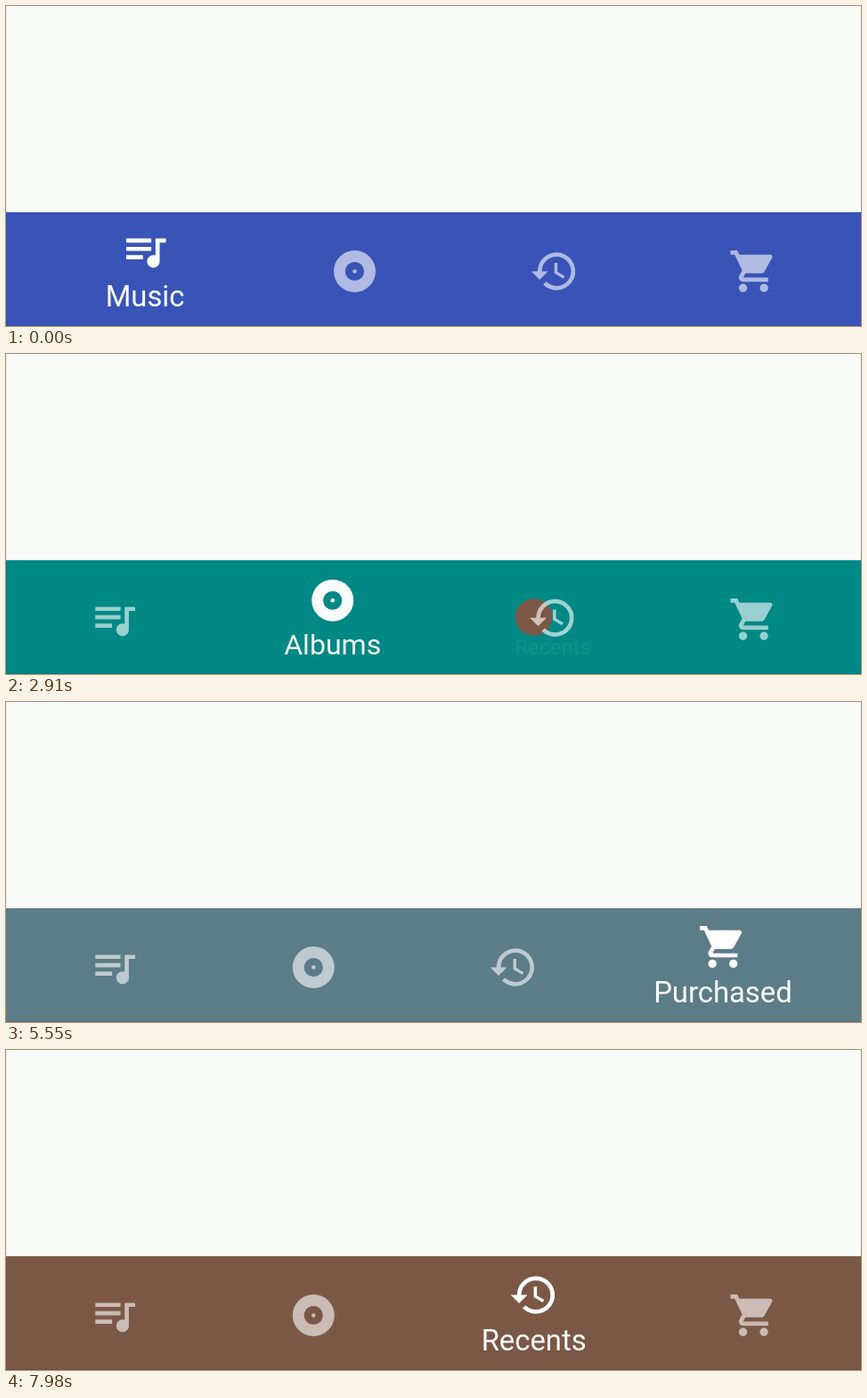
An HTML page with a canvas that plays this animation: 960x360 px, repeating every 8 s.

```html
<!DOCTYPE html>
<html lang="en">
<head>
<meta charset="utf-8">
<title>Shifting bottom navigation</title>
<style>
  html, body { margin: 0; width: 100%; height: 100%; overflow: hidden; background: #f9fbf8; }
  canvas { display: block; }
</style>
</head>
<body>
<canvas id="stage" width="960" height="360"></canvas>
<script>
const ctx = document.getElementById('stage').getContext('2d');
const LOOP = 8000, WIDTH = 960, HEIGHT = 360, BAR_TOP = 232, ICON_SCALE = 2.35;
const SHIFT_MS = 180, REVEAL_MS = 330;

// x: centre while selected; shift: sideways move when another tab is selected
const tabs = [
  { label: 'Music', color: '#3954b6', x: 156.1, shift: 34.6,
    icon: 'M15 6H3v2h12V6zm0 4H3v2h12v-2zM3 16h8v-2H3v2zM17 6v8.18c-.31-.11-.65-.18-1-.18-1.66 0-3 1.34-3 3s1.34 3 3 3 3-1.34 3-3V8h3V6h-5z' },
  { label: 'Albums', color: '#008885', x: 368.4, shift: 23.1,
    icon: 'M12 2a10 10 0 1 0 0 20a10 10 0 1 0 0-20zm0 14.5a4.5 4.5 0 1 1 0-9a4.5 4.5 0 1 1 0 9zm0-5.5a1 1 0 1 0 0 2a1 1 0 1 0 0-2z' },
  { label: 'Recents', color: '#7b5846', x: 592.6, shift: 23.1,
    icon: 'M13 3a9 9 0 0 0-9 9H1l3.89 3.89.07.14L9 12H6a7 7 0 1 1 7 7c-1.93 0-3.68-.79-4.94-2.06l-1.42 1.42A9 9 0 1 0 13 3zm-1 5v5l4.28 2.54.72-1.21-3.5-2.08V8H12z' },
  { label: 'Purchased', color: '#5c7c88', x: 804.9, shift: 34.4,
    icon: 'M7 18a2 2 0 1 0 0 4a2 2 0 1 0 0-4zM1 2v2h2l3.6 7.59-1.35 2.45c-.16.28-.25.61-.25.96 0 1.1.9 2 2 2h12v-2H7.42c-.14 0-.25-.11-.25-.25l.03-.12.9-1.63h7.45c.75 0 1.41-.41 1.75-1.03l3.58-6.49c.08-.14.12-.31.12-.48 0-.55-.45-1-1-1H5.21l-.94-2H1zm16 16a2 2 0 1 0 0 4a2 2 0 1 0 0-4z' }
];
tabs.forEach(tab => tab.path = new Path2D(tab.icon));

// Selections as [start time, tab index]
const taps = [[-1000, 0], [1540, 1], [2880, 2], [4220, 3], [5640, 0], [6950, 2]];

const clamp = v => Math.max(0, Math.min(1, v));
const mix = (a, b, p) => a + (b - a) * p;
const ease = p => (1 - Math.cos(Math.PI * p)) / 2;

function pose(index, selected) {
  const side = Math.sign(index - selected);
  return {
    x: tabs[index].x + side * tabs[index].shift,
    y: side ? 298.5 : 275.6,
    active: side ? 0 : 1
  };
}

function drawTab(index, from, to, progress) {
  const a = pose(index, from), b = pose(index, to), tab = tabs[index];
  const x = mix(a.x, b.x, progress);
  const active = mix(a.active, b.active, progress);

  ctx.save();
  ctx.globalAlpha = mix(0.6, 1, active);
  ctx.translate(x, mix(a.y, b.y, progress));
  ctx.scale(ICON_SCALE, ICON_SCALE);
  ctx.translate(-12, -12);
  ctx.fill(tab.path);
  ctx.restore();

  if (active > 0) {
    ctx.save();
    ctx.globalAlpha = active;
    ctx.translate(x, 338);
    ctx.scale(mix(0.7, 1, active), mix(0.7, 1, active));
    ctx.fillText(tab.label, 0, 0);
    ctx.restore();
  }
}

function drawBar(time) {
  const current = taps.findLastIndex(tap => tap[0] <= time);
  const [start, to] = taps[current];
  const from = current ? taps[current - 1][1] : to;
  const reveal = clamp((time - start) / REVEAL_MS);

  ctx.save();
  ctx.beginPath();
  ctx.rect(0, BAR_TOP, WIDTH, HEIGHT - BAR_TOP);
  ctx.clip();
  ctx.fillStyle = tabs[reveal < 1 ? from : to].color;
  ctx.fillRect(0, BAR_TOP, WIDTH, HEIGHT - BAR_TOP);
  if (reveal < 1) {
    ctx.fillStyle = tabs[to].color;
    ctx.beginPath();
    ctx.arc(tabs[to].x, 296, WIDTH * ease(reveal), 0, Math.PI * 2);
    ctx.fill();
  }
  ctx.fillStyle = 'rgba(0, 0, 0, .1)';
  ctx.fillRect(0, HEIGHT - 1, WIDTH, 1);
  ctx.restore();

  ctx.fillStyle = '#fff';
  ctx.font = '32.8px Roboto, sans-serif';
  ctx.textAlign = 'center';
  const progress = ease(clamp((time - start) / SHIFT_MS));
  tabs.forEach((_, index) => drawTab(index, from, to, progress));
}

function frame() {
  ctx.fillStyle = '#f9fbf8';
  ctx.fillRect(0, 0, WIDTH, HEIGHT);
  ctx.fillStyle = '#e9ebe9';
  ctx.fillRect(0, 0, 1, BAR_TOP);
  ctx.fillRect(WIDTH - 1, 0, 1, BAR_TOP);
  drawBar(performance.now() % LOOP);
  requestAnimationFrame(frame);
}
frame();
</script>
</body>
</html>
```
